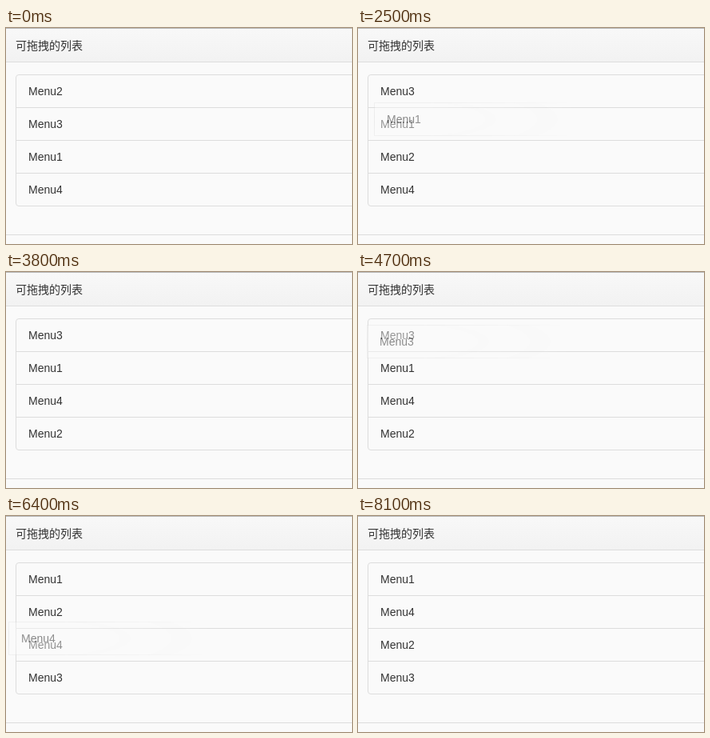
Write an HTML page that moves like this. It is 433 by 270 pixels and loops after 9.3 s.

```html
<!DOCTYPE html>
<html lang="zh-CN">
<head>
<meta charset="utf-8">
<title>可拖拽的列表</title>
<style>
html, body { margin: 0; width: 100%; height: 100%; overflow: hidden; background: #fafafa; }
#stage {
  position: relative; width: 433px; height: 270px; overflow: hidden;
  background: #fafafa; color: #333;
  font: 14px/20px "Liberation Sans", Arial, "Noto Sans CJK SC", "Noto Sans CJK", sans-serif;
}
header {
  box-sizing: border-box; height: 43px; padding: 11px 12px;
  border-top: 1px solid #b8b8b8; border-bottom: 1px solid #ddd;
  background: linear-gradient(#f8f8f8, #f2f2f2);
}
#list {
  position: absolute; box-sizing: border-box; left: 12px; top: 58px;
  width: 460px; height: 165px; border: 1px solid #ddd; border-radius: 4px;
}
.row { box-sizing: border-box; height: 41px; padding: 10px 15px; }
#list .row + .row { border-top: 1px solid #ddd; }
#list .row:first-child { height: 40px; }
#ghost {
  position: absolute; left: 12px; top: 58px; width: 460px; height: 42px;
  border: 1px solid #ddd; background: #fafafa;
  --fade: radial-gradient(230px 50px at 38px 21px, rgba(0,0,0,.6), transparent);
  -webkit-mask-image: var(--fade); mask-image: var(--fade);
}
footer { position: absolute; left: 0; right: 0; top: 258px; height: 1px; background: #ddd; }
</style>
</head>
<body>
<div id="stage">
  <header>可拖拽的列表</header>
  <div id="list">
    <div class="row"></div><div class="row"></div><div class="row"></div><div class="row"></div>
  </div>
  <div id="ghost" class="row"></div>
  <footer></footer>
</div>
<script>
const LOOP = 9300, STEP = 100, PITCH = 41;
const START = ['Menu2', 'Menu3', 'Menu1', 'Menu4'];

// Each drag: pointer offsets [dx, dy] per step; the last one holds until release.
const drags = [
  { from: 800, to: 1300, row: 0, path: [[2, 5], [3, 15], [4, 28], [5, 37], [5, 39]] },
  { from: 2200, to: 2700, row: 2, path: [[2, -6], [4, -20], [7, -38], [8, -47]] },
  { from: 3200, to: 3800, row: 3, path: [[1, -4], [2, -14], [4, -28], [6, -40], [7, -45]] },
  { from: 4700, to: 5500, row: 0, path: [[-1, 8], [-3, 34], [-5, 64], [-5, 90], [-4, 105], [-4, 116]] },
  { from: 6400, to: 7100, row: 1, path: [[-9, 33], [-8, 38], [-7, 42], [-7, 43]] },
  { from: 7500, to: 8100, row: 2, path: [[-1, -4], [-3, -14], [-5, -28], [-6, -41], [-7, -46]] }
];

const rows = [...document.querySelectorAll('#list .row')];
const ghost = document.getElementById('ghost');

function render(t) {
  const order = [...START];
  ghost.hidden = true;
  ghost.style.display = 'none';
  for (const { from, to, row, path } of drags) {
    if (t < from) break;
    const step = Math.floor((t - from) / STEP);
    const [dx, dy] = path[Math.min(step, path.length - 1)];
    const [item] = order.splice(row, 1);
    order.splice(row + Math.round(dy / PITCH), 0, item);
    if (t < to) {
      ghost.hidden = false;
      ghost.style.display = 'block';
      ghost.textContent = item;
      ghost.style.transform = `translate(${dx}px, ${row * PITCH + dy}px)`;
    }
  }
  rows.forEach((el, i) => { el.textContent = order[i]; });
}

const origin = performance.now();
function tick() {
  render((performance.now() - origin) % LOOP);
  requestAnimationFrame(tick);
}
tick();
</script>
</body>
</html>
```
